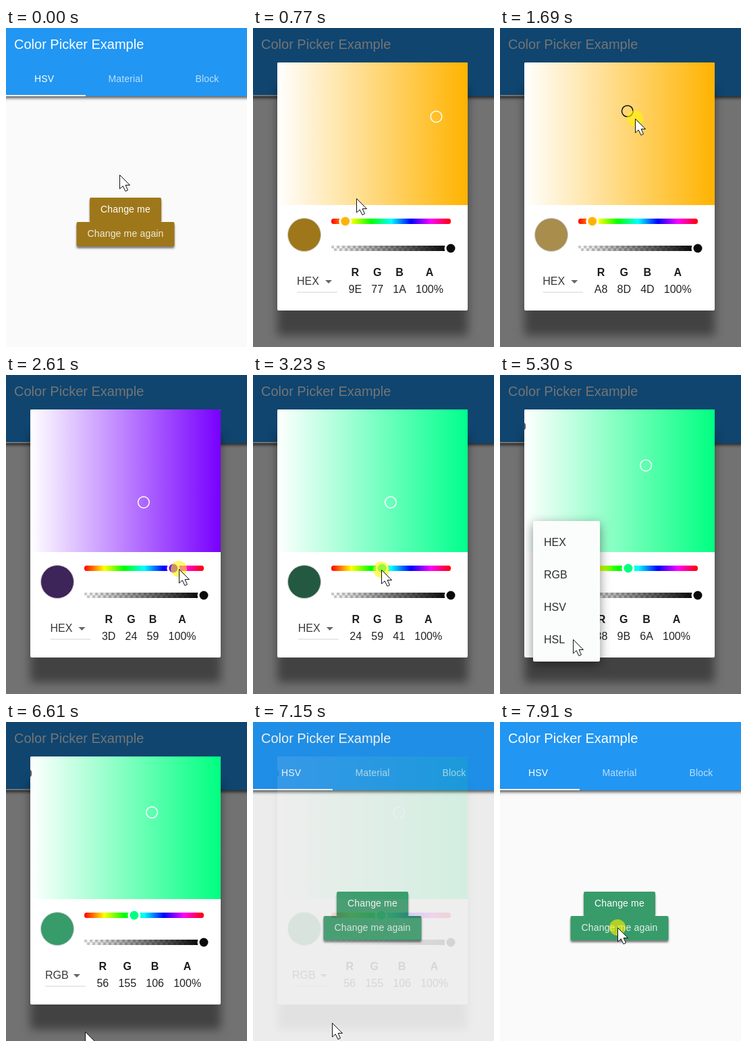
An HTML page with a canvas for the animation above (7.99 s loop, 357 by 472 pixels).

```html
<!DOCTYPE html>
<html lang="en">
<head>
<meta charset="utf-8">
<title>Color Picker Example</title>
<style>
html, body { margin: 0; width: 100%; height: 100%; overflow: hidden; background: #fafafa; }
canvas { display: block; }
</style>
</head>
<body>
<canvas id="stage" width="357" height="472"></canvas>
<script>
const W = 357, H = 472, LOOP = 7990, STEPS = 104;
const FONT = '"Liberation Sans", Arial, sans-serif';
const BOX = { x: 36, y: 51, w: 282, h: 211 };
const BAR = { x: 116, w: 177 };

const stage = document.getElementById('stage').getContext('2d');
const sheet = document.createElement('canvas');
sheet.width = W;
sheet.height = H;
let c = stage;

// Pointer path: step, x, y
const PATH = [
  [0, 168, 217], [1, 153, 252], [13, 153, 252], [16, 178, 196], [19, 181, 118],
  [21, 188.75, 123], [22, 200, 134], [24, 203.9, 188.36], [27, 203.9, 188.36],
  [30, 138, 286], [31, 152, 287], [33, 247.9, 287], [34, 256, 287], [35, 271, 287],
  [38, 252, 287], [41, 191.14, 288], [42, 190, 288], [43, 185, 288], [44, 189.9, 288],
  [46, 189.9, 288], [48, 180, 170], [50, 37, 76], [53, 216.1, 133.75],
  [54, 216.1, 133.75], [57, 128, 332], [59, 110, 384], [61, 108, 376],
  [64, 108, 376], [66, 108, 391], [70, 108, 391], [74, 97, 298], [81, 97, 298],
  [84, 112, 425], [86, 117, 458], [90, 117, 458], [94, 117, 441], [95, 117, 441],
  [101, 174, 304], [104, 174, 304]
];
const PRESSES = [[7, 8], [17, 25], [30, 45], [48, 54], [64, 64], [75, 76], [90, 91], [101, 104]];

const within = (n, a, b) => n >= a && n <= b;
const clamp = v => Math.max(0, Math.min(1, v));

function pointer(n) {
  let i = 1;
  while (i < PATH.length - 1 && PATH[i][0] < n) i++;
  const [n0, x0, y0] = PATH[i - 1], [n1, x1, y1] = PATH[i];
  const k = clamp((n - n0) / (n1 - n0));
  return { x: x0 + (x1 - x0) * k, y: y0 + (y1 - y0) * k };
}

function toRgb(h, s, v) {
  return [5, 3, 1].map(o => {
    const k = (o + h / 60) % 6;
    return Math.round(255 * (v - v * s * clamp(Math.min(k, 4 - k))));
  });
}
const css = rgb => `rgb(${rgb.join(',')})`;
const hueCss = h => css(toRgb(h, 1, 1));

// The picked colour trails the pointer by one step
function pickedAt(n) {
  const p = { h: 42.2, s: 0.835, v: 0.62 };
  for (let k = 1; k <= n; k++) {
    const m = pointer(k - 1);
    if (within(k, 18, 26) || within(k, 49, 55)) {
      p.s = clamp((m.x - BOX.x) / BOX.w);
      p.v = 1 - clamp((m.y - BOX.y) / BOX.h);
    } else if (within(k, 31, 46)) {
      p.h = clamp((m.x - BAR.x) / BAR.w) * 360;
    }
  }
  p.rgb = toRgb(p.h, p.s, p.v);
  return p;
}

function dialogAlpha(n) {
  if (n < 7 || n >= 94) return 0;
  if (n < 10) return [0.2, 0.5, 0.85][n - 7];
  return n < 90 ? 1 : [0.85, 0.55, 0.27, 0.1][n - 90];
}

function rect(x, y, w, h, fill, r = 0) {
  c.fillStyle = fill;
  c.beginPath();
  c.roundRect(x, y, w, h, r);
  c.fill();
}

function raised(x, y, w, h, fill, r, dy, blur, shade) {
  c.save();
  c.shadowColor = `rgba(0,0,0,${shade})`;
  c.shadowBlur = blur;
  c.shadowOffsetY = dy;
  rect(x, y, w, h, fill, r);
  c.restore();
}

function disc(x, y, r, fill) {
  c.fillStyle = fill;
  c.beginPath();
  c.arc(x, y, r, 0, 7);
  c.fill();
}

function ring(x, y, r, color, width) {
  c.strokeStyle = color;
  c.lineWidth = width;
  c.beginPath();
  c.arc(x, y, r, 0, 7);
  c.stroke();
}

function text(str, x, y, size, color, { bold = false, align = 'left', gap = 0 } = {}) {
  c.font = `${bold ? 'bold ' : ''}${size}px ${FONT}`;
  c.letterSpacing = gap + 'px';
  c.textAlign = align;
  c.fillStyle = color;
  c.fillText(str, x, y);
}

function ramp(x, w, colors) {
  const g = c.createLinearGradient(x, 0, x + w, 0);
  colors.forEach((col, i) => g.addColorStop(i / (colors.length - 1), col));
  return g;
}

function layer(alpha, draw) {
  if (alpha <= 0) return;
  c = sheet.getContext('2d');
  c.clearRect(0, 0, W, H);
  draw();
  c = stage;
  c.globalAlpha = alpha;
  c.drawImage(sheet, 0, 0);
  c.globalAlpha = 1;
}

function drawPage(color) {
  rect(0, 0, W, H, '#fafafa');
  raised(-10, -10, W + 20, 111, '#2196f3', 0, 3, 4, 0.6);
  text('Color Picker Example', 12, 31, 20, '#fff');
  const dim = 'rgba(255,255,255,.7)';
  text('HSV', 42, 80, 14, '#fff', { gap: 0.15 });
  text('Material', 151.5, 80, 14, dim, { gap: 0.15 });
  text('Block', 280.5, 80, 14, dim, { gap: 0.15 });
  rect(0, 99, 118, 2, '#f4f9fd');
  raised(124, 251, 106, 36, color, 2, 3, 3, 0.5);
  raised(104.5, 287, 145, 36, color, 2, 3, 3, 0.5);
  text('Change me', 140, 273, 14, '#fff', { gap: 0.17 });
  text('Change me again', 120.5, 309, 14, 'rgba(255,255,255,.85)', { gap: 0.17 });
}

function drawSliders(p) {
  const { x, w } = BAR;
  const hues = [0, 60, 120, 180, 240, 300, 360].map(hueCss);
  rect(x, 282, w, 8, ramp(x, w, hues), 3.5);

  c.save();
  c.beginPath();
  c.rect(x, 322, w, 8);
  c.clip();
  for (let i = 0; i * 4 < w; i++) rect(x + i * 4, 322 + (i % 2) * 4, 4, 4, '#ccc');
  rect(x, 322, w, 8, ramp(x, w, ['rgba(0,0,0,0)', '#000']));
  c.restore();

  const hx = x + p.h / 360 * w;
  disc(hx, 286, 9.5, '#fff');
  disc(hx, 286, 6.5, hueCss(p.h));
  disc(x + w, 326, 9.5, '#fff');
  disc(x + w, 326, 6.5, '#0a0a0a');
}

function drawValues(p, hex) {
  const vals = p.rgb.map(v => hex ? v.toString(16).toUpperCase().padStart(2, '0') : String(v));
  vals.push('100%');
  c.font = '16px ' + FONT;
  c.letterSpacing = '0px';
  const widths = vals.map(v => c.measureText(v).width);
  let x = 173.5 - (119.1 + widths.reduce((a, b) => a + b)) / 2;

  text(hex ? 'HEX' : 'RGB', x, 380, 16, '#383838');
  c.beginPath();
  c.moveTo(x + 42, 373);
  c.lineTo(x + 52, 373);
  c.lineTo(x + 47, 378);
  c.fillStyle = '#666';
  c.fill();
  rect(x, 390.5, 60, 1, '#d4d4cc');

  x += 76.5;
  vals.forEach((v, i) => {
    const mid = x + widths[i] / 2;
    text('RGBA'[i], mid, 367, 16, '#1c1c1c', { bold: true, align: 'center' });
    text(v, mid, 392, 16, '#222', { align: 'center' });
    x += widths[i] + 14.2;
  });
}

function drawDialog(n, p) {
  raised(36, 51, 282, 367, '#fff', 2, 37, 14, 0.42);
  rect(BOX.x, BOX.y, BOX.w, BOX.h, ramp(BOX.x, BOX.w, ['#fff', hueCss(p.h)]), [2, 2, 0, 0]);
  if (n > 50) {
    c.fillStyle = 'rgba(50,60,60,.8)';
    c.beginPath();
    c.ellipse(36, 76, 2.2, 5, 0, -Math.PI / 2, Math.PI / 2);
    c.fill();
  }
  const [r, g, b] = p.rgb;
  const light = Math.sqrt(0.299 * r * r + 0.587 * g * g + 0.114 * b * b);
  ring(BOX.x + p.s * BOX.w, BOX.y + (1 - p.v) * BOX.h, 8.3, light < 130 ? '#fff' : '#111', 1.5);

  disc(76, 306, 24.5, css(p.rgb));
  ring(76, 306, 24.5, '#ccc', 1);
  drawSliders(p);
  drawValues(p, n < 76);
}

function drawMenu(n) {
  const grow = clamp((n - 64) / 4);
  const h = 48 + 160 * grow;
  raised(49, 216, 99, h, '#fbfdfc', 2, 5, 16, 0.45);
  c.save();
  c.beginPath();
  c.rect(49, 216, 99, h);
  c.clip();
  ['HEX', 'RGB', 'HSV', 'HSL'].forEach((s, i) => text(s, 65, 253 + i * 48, 16, '#2c2c2c'));
  c.restore();
}

function drawPointer(n) {
  const { x, y } = pointer(n);
  if (PRESSES.some(([a, b]) => within(n, a, b))) disc(x, y, 12, 'rgba(255,245,0,.6)');
  c.save();
  c.translate(Math.round(x) + 0.5, Math.round(y) + 0.5);
  c.beginPath();
  [[0, 0], [0, 20.5], [4.7, 16.3], [8.4, 24], [12, 22.4], [8.6, 15], [15, 15]]
    .forEach(([px, py]) => c.lineTo(px, py));
  c.closePath();
  c.fillStyle = '#fff';
  c.fill();
  c.strokeStyle = '#111';
  c.lineWidth = 1;
  c.stroke();
  c.restore();
}

function draw(t) {
  const n = Math.min(STEPS - 1, Math.floor((t + 4) / (LOOP / STEPS)));
  const p = pickedAt(n);
  const shown = dialogAlpha(n);
  drawPage(css(p.rgb));
  rect(0, 0, W, H, `rgba(0,0,0,${0.54 * shown})`);
  layer(shown, () => drawDialog(n, p));
  if (within(n, 65, 78)) {
    layer(Math.min(clamp((n - 64) / 3), clamp((79 - n) / 4)), () => drawMenu(n));
  }
  drawPointer(n);
}

const start = performance.now();
function tick() {
  draw((performance.now() - start) % LOOP);
  requestAnimationFrame(tick);
}
tick();
</script>
</body>
</html>
```
